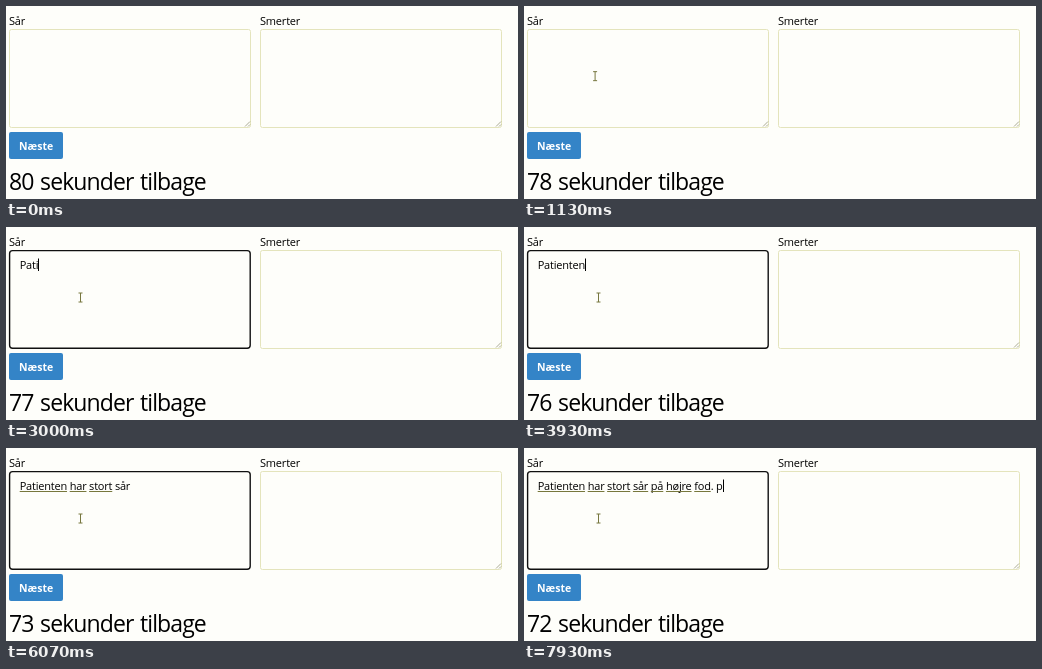
These frames come from a looping animation (512x193 px, 8000 ms). An HTML page:

```html
<!DOCTYPE html>
<html lang="da">
<head>
<meta charset="utf-8">
<title>Sår og smerter</title>
<style>
  html, body { margin: 0; width: 100%; height: 100%; overflow: hidden; background: #fefefa; }
  svg { display: block; width: 100%; height: 100%; }
  text { font: 500 11px "Open Sans", "Noto Sans", sans-serif; letter-spacing: -0.2px; white-space: pre; fill: #000; }
  #next { font-weight: 700; font-size: 10.5px; letter-spacing: 0; fill: #fff; }
  #count { font-size: 23px; letter-spacing: -0.9px; word-spacing: 1.5px; }
  .area { fill: none; stroke: #e4e4bc; }
  .grip { fill: none; stroke: #96967c; stroke-width: .8; }
  #focus { fill: none; stroke: #101010; stroke-width: 1.4; }
  #marks { fill: none; stroke: #77773c; }
  #caret { stroke: #000; }
  #mouse { fill: none; stroke: #77773f; }
</style>
</head>
<body>
<svg viewBox="0 0 512 193">
  <defs>
    <g id="area">
      <rect class="area" x=".5" y=".5" width="241" height="98" rx="2"/>
      <path class="grip" d="M236 97.500l5-5M239 97.500l2-2"/>
    </g>
  </defs>

  <text x="3" y="19">Sår</text>
  <text x="254" y="19">Smerter</text>
  <use id="idle" href="#area" x="3" y="23"/>
  <use href="#area" x="254" y="23"/>
  <rect id="focus" x="3.600" y="23.600" width="240.600" height="97.600" rx="3"/>

  <rect x="3" y="126" width="54" height="27" rx="2" fill="#3484c7"/>
  <text id="next" x="13" y="144">Næste</text>
  <text id="count" x="3" y="184"></text>

  <text id="note" x="13.700" y="42"></text>
  <path id="marks"/>
  <path id="caret" d="M.5 31.500v12.500"/>
  <path id="mouse" d="M-2 -4.500h4M0 -4.500v9M-2 4.500h4"/>
</svg>
<script>
  const LOOP = 8000, FOCUS = 1410, BLINK = 520;
  const message = "Patienten har stort sår på højre fod. p";

  // Typing comes in even bursts: first key, last key, characters
  const bursts = [
    [2200, 2730, 4], [3600, 3920, 5], [4070, 5530, 14],
    [6130, 6590, 5], [6800, 7920, 11]
  ];
  const keys = bursts.flatMap(([from, to, n]) =>
    Array.from({ length: n }, (_, i) => from + (to - from) * i / (n - 1)));

  const $ = id => document.getElementById(id);
  const note = $("note"), count = $("count"), left = 13.7;
  let shown = null;

  const show = (id, on) => $(id).setAttribute("visibility", on ? "visible" : "hidden");
  const edge = n => left + (n ? note.getSubStringLength(0, n) : 0);

  function glide(t, from, to) {
    const k = Math.min(1, Math.max(0, (t - from) / (to - from)));
    return 1 - (1 - k) ** 4;
  }

  // The pointer sweeps in from below, rests, then moves aside to click
  function pointerAt(t) {
    const a = glide(t, 70, 470), b = glide(t, 870, 1530);
    return [20 + 29 * a + 25.5 * b, 200 - 132 * a + 2.5 * b];
  }

  function setNote(n) {
    if (n === shown) return;
    shown = n;
    const typed = message.slice(0, n);
    note.textContent = typed;
    // Finished words get a spelling mark
    const words = [...typed.matchAll(/[a-zæøå]+(?=[ .])/gi)];
    $("marks").setAttribute("d", words.map(w =>
      `M${edge(w.index)} 43.5H${edge(w.index + w[0].length)}`).join(""));
    $("caret").setAttribute("transform", `translate(${Math.round(edge(n))} 0)`);
  }

  function draw(t) {
    const n = keys.filter(k => k <= t).length;
    const since = t - (n ? keys[n - 1] : FOCUS);
    const focused = t >= FOCUS;
    setNote(n);
    show("focus", focused);
    show("idle", !focused);
    show("caret", focused && Math.floor(since / BLINK) % 2 === 0);
    const label = `${80 - Math.floor((t + 930) / 1000)} sekunder tilbage`;
    if (count.textContent !== label) count.textContent = label;
    $("mouse").setAttribute("transform", `translate(${pointerAt(t)})`);
  }

  const start = performance.now();
  function tick() {
    draw((performance.now() - start) % LOOP);
    requestAnimationFrame(tick);
  }
  tick();
</script>
</body>
</html>
```
